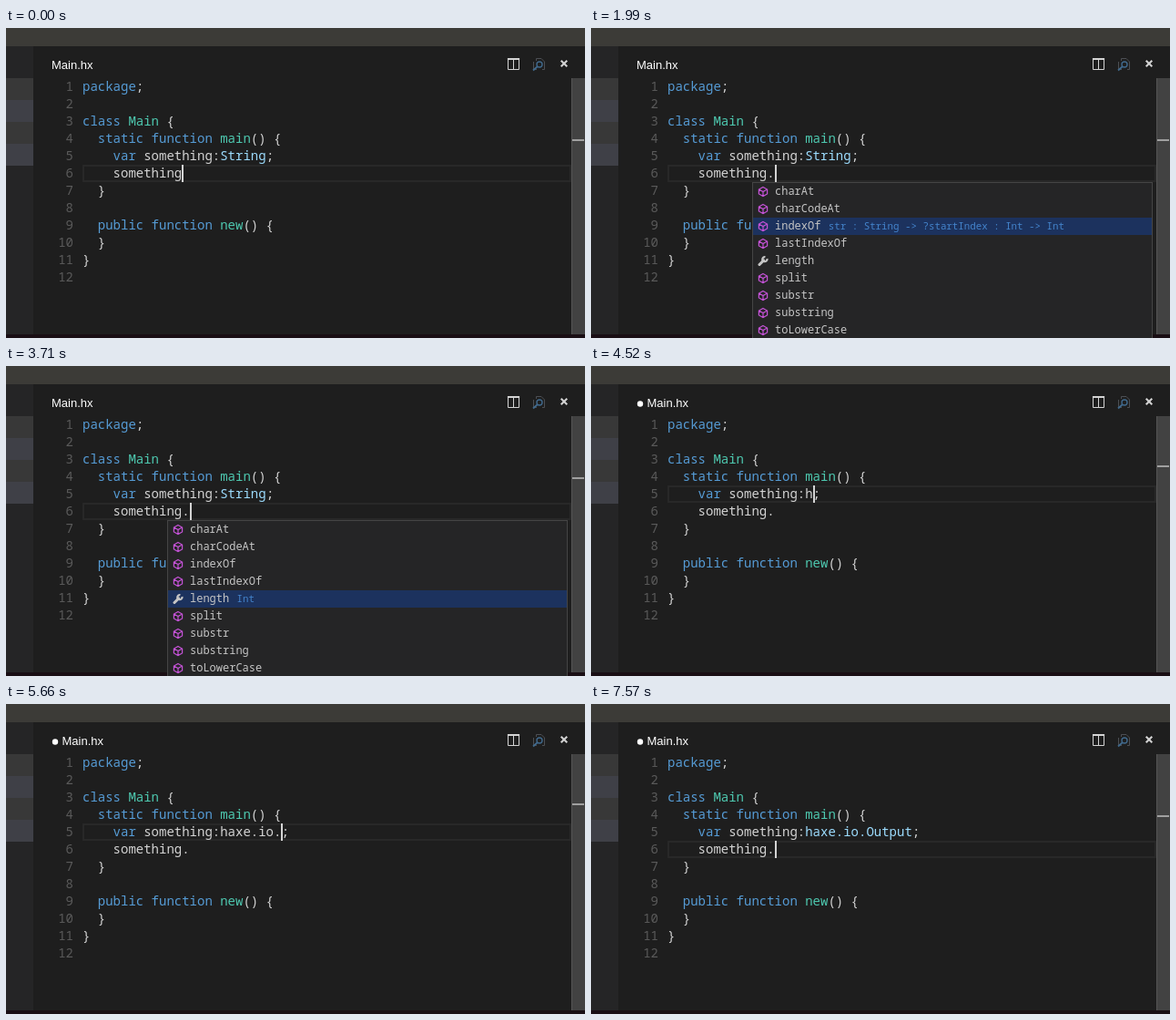
Recreate the animation shown at these times as an HTML page. Size 636x340 px, loop 8 s.

```html
<!DOCTYPE html>
<html lang="en">
<head>
<meta charset="utf-8">
<title>Code completion</title>
<style>
html, body { margin: 0; width: 100%; height: 100%; overflow: hidden; background: #1e1e1e; }
svg { display: block; }
text { white-space: pre; font: 14px "Noto Sans Mono", "DejaVu Sans Mono", monospace; fill: #d4d4d4; }
.num { fill: #5a5a5a; text-anchor: end; }
.key { fill: #569cd6; }
.name { fill: #4ec9b0; }
.type { fill: #9cdcfe; }
.tab { font: 13px "Liberation Sans", Arial, sans-serif; fill: #fff; }
.item { font-size: 12px; fill: #c5c5c5; }
.hit { fill: #1a93f5; }
.detail { font-size: 10.8px; fill: #4484cc; }
</style>
</head>
<body>
<svg width="636" height="340" viewBox="0 0 636 340">
  <defs>
    <path id="method" d="M0-5L4.6-2.5V2.5L0 5L-4.6 2.5V-2.5ZM-4.6-2.5L0 0L4.6-2.5M0 0V5" fill="none" stroke="#c653d8" stroke-width="1.2"/>
    <g id="property" fill="none" stroke="#c5c5c5">
      <path d="M-4 4L.6-.6" stroke-width="3" stroke-linecap="round"/>
      <path d="M4.4-2.4A2.6 2.6 0 1 1 2.4-4.4" stroke-width="2.2"/>
    </g>
  </defs>
  <rect width="636" height="20" fill="#3c3b37"/>
  <rect y="20" width="30" height="320" fill="#252526"/>
  <path d="M0 55H30V79H0ZM0 103H30V127H0Z" fill="#383838"/>
  <path d="M0 79H30V103H0ZM0 127H30V151H0Z" fill="#3f4047"/>
  <rect x="621" y="55" width="15" height="281" fill="#424242"/>
  <path d="M621.5 55V336" stroke="#555"/>
  <rect y="336" width="636" height="4" fill="#190e14"/>
  <g fill="none">
    <path d="M551 34H564M551.5 33V45.5H563.5V33M557.5 33V45" stroke="#d4d4d4"/>
    <path d="M550.9 34H564.1" stroke="#d4d4d4" stroke-width="2"/>
    <path d="M583 45.5H579.5V37M582.5 36V33.5H588L591.5 37V45.5H589" stroke="#4c4f54"/>
    <circle cx="586" cy="40" r="3" stroke="#40698c" stroke-width="1.4"/>
    <path d="M584 42L579 46.5" stroke="#40698c" stroke-width="1.8"/>
    <path d="M609.7 35.7L616.3 42.3M616.3 35.7L609.7 42.3" stroke="#d4d4d4" stroke-width="2"/>
  </g>
  <g id="view"></g>
</svg>
<script>
const LOOP = 8000, ROW = 19, TOP = 55, LEFT = 84, CHAR = 8.4;

const list = (icon, names) => names.split(' ').map(name => ({ name, icon, detail: '' }));
const search = 'str : String -> ?startIndex : Int -> Int';
const stringFields = [
  ['charAt', 'index : Int -> String'], ['charCodeAt', 'index : Int -> Null<Int>'],
  ['indexOf', search], ['lastIndexOf', search], ['length', 'Int'], ['split', ''],
  ['substr', ''], ['substring', ''], ['toLowerCase', '']
].map(([name, detail]) => ({ name, detail, icon: name === 'length' ? 'property' : 'method' }));
const haxeTypes = list('property', 'CallStack Constraints crypto ds DynamicAccess EnumFlags EnumTools extern format Http Int32 Int64 io Json Log');
const ioTypes = list('property', 'ArrayBufferView Bytes BytesBuffer BytesData BytesInput BytesOutput Eof Error Float32Array Float64Array FPHelper Input Output Path');

// Each step changes some fields of the editor state.
const steps = [
  [0, { type: 'String', tail: '', row: 6, col: null, on: true, dirty: false, selected: false, items: null, pick: 0 }],
  [100, { on: false }],
  [600, { on: true }],
  [810, { tail: '.' }],
  [890, { items: stringFields }],
  [1270, { on: false }],
  [1700, { pick: 1 }],
  [1780, { on: true }],
  [1990, { pick: 2 }],
  [2230, { pick: 3 }],
  [2270, { on: false }],
  [2510, { pick: 4 }],
  [2720, { on: true }],
  [3210, { on: false }],
  [3710, { on: true }],
  [3870, { items: null }],
  [3910, { row: 5, col: 21 }],
  [4140, { col: null, selected: true }],
  [4390, { type: 'h', selected: false }],
  [4480, { dirty: true }],
  [4560, { type: 'ha' }],
  [4640, { type: 'hax' }],
  [4790, { type: 'haxe' }],
  [4960, { type: 'haxe.' }],
  [5040, { items: haxeTypes, dirty: false }],
  [5200, { type: 'haxe.i', dirty: true }],
  [5350, { type: 'haxe.io' }],
  [5660, { type: 'haxe.io.', items: null }],
  [5700, { items: ioTypes, dirty: false }],
  [5900, { type: 'haxe.io.o', dirty: true }],
  [6260, { type: 'haxe.io.ou' }],
  [6380, { type: 'haxe.io.out' }],
  [6870, { on: false }],
  [6960, { type: 'haxe.io.Output', items: null, on: true }],
  [7410, { on: false }],
  [7570, { row: 6, on: true }]
];

const esc = s => s.replace(/</g, '&lt;');
const span = (cls, s) => `<tspan class="${cls}">${esc(s)}</tspan>`;
const text = (x, y, s, cls = '') => `<text x="${x}" y="${y}" class="${cls}">${s}</text>`;
const rect = (x, y, w, h, fill, more = '') =>
  `<rect x="${x}" y="${y}" width="${w}" height="${h}" fill="${fill}" ${more}/>`;
const lineTop = row => TOP + (row - 1) * ROW;
const key = s => span('key', s);
const name = s => span('name', s);

function codeLines(s) {
  const type = /[A-Z]/.test(s.type) ? span('type', s.type) : s.type;
  return [
    key('package') + ';', '',
    `${key('class')} ${name('Main')} {`,
    `  ${key('static function')} ${name('main')}() {`,
    `    ${key('var')} something:${type};`,
    `    something${s.tail}`,
    '  }', '',
    `  ${key('public function')} ${name('new')}() {`,
    '  }', '}', ''
  ];
}

function popup(s) {
  const word = s.row === 5 ? s.type.split('.').pop().toLowerCase() : '';
  const find = item => item.name.toLowerCase().indexOf(word);
  const items = s.items.filter(item => find(item) >= 0);
  const pick = word ? Math.max(0, items.findIndex(item => find(item) === 0)) : s.row === 6 ? s.pick : 0;
  const top = lineTop(s.row + 1);
  let out = rect(177.5, top + .5, 439, items.length * ROW + 1, '#252526', 'stroke="#454545"');
  items.forEach((item, i) => {
    const y = top + 1 + i * ROW, at = find(item), end = at + word.length, n = item.name;
    if (i === pick) out += rect(178, y, 438, ROW, '#1c325e');
    out += `<use href="#${item.icon}" x="189" y="${y + 9.5}"/>`;
    out += text(202, y + 13, n.slice(0, at) + span('hit', n.slice(at, end)) + n.slice(end), 'item');
    if (i === pick) out += text(210.4 + n.length * 7.2, y + 13, esc(item.detail), 'detail');
  });
  return out;
}

function draw(s) {
  const y = lineTop(s.row);
  const col = s.col ?? (s.row === 5 ? 18 + s.type.length : 13 + s.tail.length);
  let out = s.dirty
    ? '<circle cx="54" cy="41.5" r="3.2" fill="#fff"/>' + text(61.5, 45, 'Main.hx', 'tab')
    : text(50, 45, 'Main.hx', 'tab');
  if (s.selected) {
    out += rect(235, y, 6 * CHAR, ROW, '#264f78') + rect(626, 113, 5, 5, '#6a6a6a');
  } else {
    out += rect(85, y + 1, 535, ROW - 2, 'none', 'stroke="#282828" stroke-width="2"');
  }
  out += rect(622, s.row === 5 ? 109 : 122, 13, 2, '#a0a0a0');
  codeLines(s).forEach((line, i) => {
    const base = lineTop(i + 1) + 14;
    out += text(74, base, i + 1, 'num') + text(LEFT, base, line);
  });
  if (s.on) out += rect(Math.round(LEFT + col * CHAR), y, 2, ROW, '#d4d4d4');
  if (s.items) out += popup(s);
  return out;
}

const view = document.getElementById('view');
const start = performance.now();
let shown = -1;

function frame() {
  const t = (performance.now() - start) % LOOP;
  const count = steps.filter(([at]) => at <= t).length;
  if (count !== shown) {
    shown = count;
    view.innerHTML = draw(Object.assign({}, ...steps.slice(0, count).map(step => step[1])));
  }
  requestAnimationFrame(frame);
}
frame();
</script>
</body>
</html>
```
